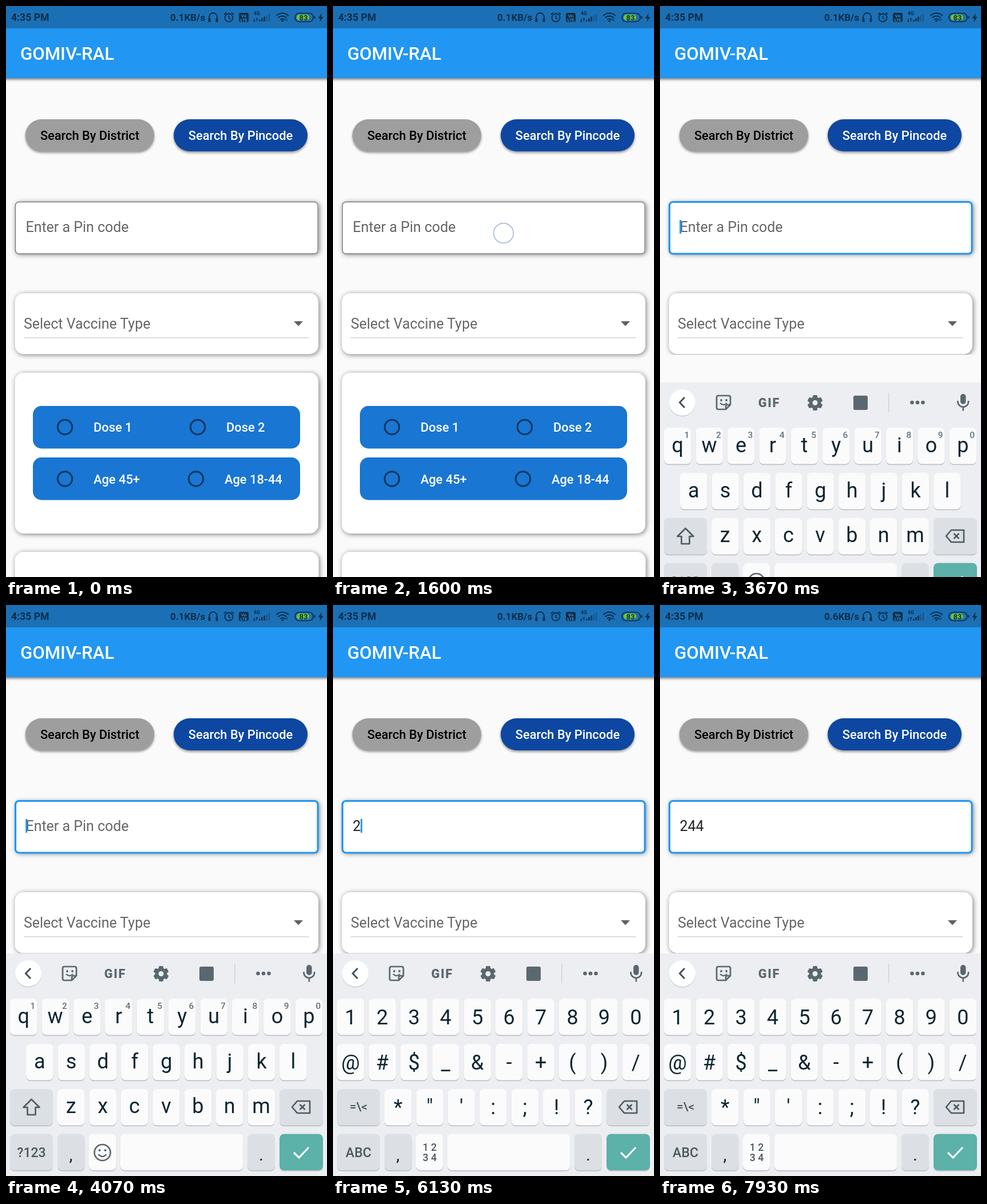
Write an HTML page that moves like this. It is 561 by 998 pixels and loops after 8 s.

```html
<!DOCTYPE html>
<html lang="en">
<head>
<meta charset="utf-8">
<title>Slot search</title>
<style>
html, body { margin: 0; width: 100%; height: 100%; overflow: hidden; background: #fafafa; }
svg { display: block; width: 561px; height: 998px; }
text { font-family: Roboto, sans-serif; white-space: pre; }
</style>
</head>
<body>
<svg id="stage" viewBox="0 0 561 998" xmlns="http://www.w3.org/2000/svg"></svg>
<script>
const LOOP = 8000;
const INK = '#0c2530', ICON = '#5a676f', STATUS = '#0d2d4a';

// ---------- markup helpers ----------
const rect = (x, y, w, h, r, fill, more = '') =>
  `<rect x="${x}" y="${y}" width="${w}" height="${h}" rx="${r}" fill="${fill}" ${more}/>`;
const text = (x, y, size, str, fill, more = '') =>
  `<text x="${x}" y="${y}" font-size="${size}" fill="${fill}" ${more}>${str}</text>`;
const mid = (x, y, size, str, fill, more = '') =>
  text(x, y, size, str, fill, 'text-anchor="middle" ' + more);
const path = (d, fill, more = '') => `<path d="${d}" fill="${fill}" ${more}/>`;
const line = (d, stroke, w, more = '') =>
  path(d, 'none', `stroke="${stroke}" stroke-width="${w}" ${more}`);
const circle = (x, y, r, fill, more = '') =>
  `<circle cx="${x}" cy="${y}" r="${r}" fill="${fill}" ${more}/>`;
const group = (id, body, more = '') => `<g id="${id}" ${more}>${body}</g>`;
const BOLD = 'font-weight="700"', MEDIUM = 'font-weight="500"';

// ---------- app ----------
const card = (x, y, w, h, r) =>
  rect(x + 1.5, y + 1.5, w, h, r, '#000', 'opacity=".5" filter="url(#soft)"') +
  rect(x, y, w, h, r, '#fff');

const dropdown = (label, y, arrow, gap) =>
  text(31, y + 9, 24.93, label, '#666') +
  path(`M503 ${y - 4}h16l-8 8.5z`, arrow) +
  rect(31, y + gap, 498.5, 1.5, 0, '#d2d2d2');

const pill = (id, x, w, label) =>
  rect(x, 200.5, w, 56, 28, '#000', 'opacity=".42" filter="url(#lift)"') +
  rect(x, 198, w, 56, 28, '#9e9e9e', `id="${id}Bg"`) +
  mid(x + w / 2, 234, 21.8, label, '#000', `id="${id}Text" ` + MEDIUM);

const radio = (x, y, label, tx) =>
  circle(x, y, 12.7, 'none', 'stroke="#0c3660" stroke-width="3"') +
  text(tx, y + 8, 21.8, label, '#fff', MEDIUM);

const statusBar = () => {
  let s = rect(0, 0, 561, 39, 0, '#1b70b5') +
    text(9, 26, 17.6, '4:35 PM', STATUS, BOLD) +
    text(287, 26, 17, '0.1KB/s', STATUS, 'id="speed" ' + BOLD);
  // headphones, alarm
  s += line('M355 25v-5a7 8 0 0 1 14 0v5', STATUS, 1.8) +
    rect(353.5, 21, 4, 7, 1.5, STATUS) + rect(366.5, 21, 4, 7, 1.5, STATUS);
  s += circle(389.5, 20.5, 7, 'none', `stroke="${STATUS}" stroke-width="1.8"`) +
    line('M389.5 16.5v4.5l3 2M381 15l4-3.5M398 15l-4-3.5', STATUS, 1.7);
  s += rect(407, 12, 17, 16, 3, STATUS) +
    mid(415.5, 19.5, 8, 'Vo', '#3e8bc4', BOLD) + mid(415.5, 26.5, 7.5, 'LTE', '#3e8bc4', BOLD);
  // mobile signal
  s += text(433, 16, 8.5, '4G', STATUS, BOLD) +
    line('M434 22v5m-1.5-1.5 1.5 2 1.5-2M438.5 27v-5m-1.5 1.5 1.5-2 1.5 2', STATUS, 1.1);
  for (let i = 0; i < 5; i++)
    s += rect(442 + i * 4.2, 24 - i * 2.7, 2.5, 3 + i * 2.7, .5, STATUS, i > 2 ? 'opacity=".35"' : '');
  // wifi
  s += line('M472 17q11-9 22 0M475.500 20.500q7.500-6 15 0M479 24q4-3 8 0', STATUS, 2) +
    circle(483, 26.3, 1.8, STATUS) + line('M488 26v-4m3 0v4', STATUS, 1.1);
  // battery
  s += rect(505, 12.500, 32, 15, 7.5, 'none', `stroke="${STATUS}" stroke-width="1.7"`) +
    rect(508, 15, 22, 10, 5, '#6fc72b') + rect(538.5, 17.5, 2, 5, 1, STATUS) +
    mid(520, 24.6, 13, '83', STATUS, BOLD);
  return s + path('M552 12l-6.500 9.500h4l-1.500 7 6.500-9.500h-4z', STATUS);
};

const app = () =>
  rect(0, 0, 561, 998, 0, '#fafafa') +
  pill('district', 34, 225, 'Search By District') +
  pill('pincode', 293, 234, 'Search By Pincode') +
  group('districtForm',
    dropdown('Select State', 326, '#616161', 18) +
    dropdown('Select District', 404, '#bdbdbd', 18)) +
  group('pinForm',
    card(16, 342, 530, 91, 7) +
    rect(16.5, 342.5, 528.5, 90.5, 6, 'none', 'id="border"') +
    text(34.5, 395, 24.93, '', '#666', 'id="entry"') +
    rect(34.2, 374, 3, 24, 0, '#2196f3', 'id="cursor"')) +
  card(15.500, 502, 530.5, 106.5, 15) + dropdown('Select Vaccine Type', 555, '#616161', 24) +
  group('lower',
    card(15.5, 641, 530.5, 281, 15) +
    rect(47, 699, 467, 74.5, 15, '#1976d2') +
    radio(103, 736, 'Dose 1', 153) + radio(335, 736, 'Dose 2', 385) +
    rect(47, 789, 467, 74.5, 15, '#1976d2') +
    radio(103, 826.5, 'Age 45+', 153) + radio(332, 826.5, 'Age 18-44', 382) +
    card(15.5, 954, 531, 80, 15)) +
  rect(0, 609.5, 561, 389, 0, '#fafafa', 'id="cut"') +
  rect(-10, 41, 581, 87.5, 0, '#000', 'opacity=".5" filter="url(#lift)"') +
  rect(0, 39, 561, 87, 0, '#2196f3') +
  text(25, 94, 31.2, 'GOMIV-RAL', '#fff', MEDIUM) +
  statusBar();

// ---------- keyboard ----------
const STEP = 55.4, ROWS = [688, 767, 846, 924.500];
const WHITE = '#fbfbfc', GREY = '#dcdfe3';

const key = (x, row, w, fill, more = '') =>
  rect(x, ROWS[row] + 1.8, w, 63.500, 8, '#bfc2c6') + rect(x, ROWS[row], w, 63.500, 8, fill, more);

const keyRow = (chars, row, x, base) => [...chars].map((c, i) =>
  key(x + i * STEP, row, 47.5, WHITE) +
  mid(x + 23.7 + i * STEP, ROWS[row] + base, 36, c === '&' ? '&amp;' : c, INK)).join('');

const bottomKeys = () =>
  key(7, 2, 75, GREY) + key(478, 2, 76, GREY) +
  line('M509 867h22v21h-22l-9-10.500z', '#4c5a62', 2.6, 'stroke-linejoin="round"') +
  line('M513.500 873l9 9m0-9l-9 9', '#4c5a62', 2.6) +
  key(7, 3, 75, GREY, 'id="modeKey"') + key(90, 3, 47.5, GREY) + key(145, 3, 47.5, WHITE) +
  key(200, 3, 214.5, WHITE) + key(422, 3, 48, GREY) + key(478, 3, 76, '#5cb1a9') +
  line('M503 957l9 9 17-18', '#fff', 3.2) +
  mid(113.5, 971, 30, ',', INK) + mid(446, 971, 30, '.', INK);

const toolbar = () => {
  let s = circle(39, 645.5, 23, '#c9ccd0') + circle(39, 644, 23, '#fff') +
    line('M43 635l-8.500 9 8.500 9', '#455159', 3);
  // sticker
  s += line('M102 632h18q3 0 3 3v13l-8 8h-13q-3 0-3-3v-18q0-3 3-3zM123 648h-5q-3 0-3 3v5', ICON, 2.7) +
    circle(107, 640, 1.9, ICON) + circle(116, 640, 1.9, ICON) +
    line('M105 645q6 6 12 0', ICON, 2.4);
  s += mid(191, 651.500, 21.5, 'GIF', ICON, 'font-weight="900" letter-spacing="1.8"');
  // gear
  for (let a = 0; a < 360; a += 60)
    s += rect(267, 631, 8, 8, 2, ICON, `transform="rotate(${a} 271 644.5)"`);
  s += circle(271, 644.5, 7.5, 'none', `stroke="${ICON}" stroke-width="6"`);
  s += rect(338, 632, 25, 25, 3, ICON);
  s += rect(399, 627, 1.5, 34, 0, '#cfd3d7');
  for (let i = -1; i < 2; i++) s += circle(450 + i * 9.5, 644, 3.3, ICON);
  // microphone
  s += rect(525, 629, 9.5, 18, 4.7, ICON) +
    line('M520.500 641v1.500a9.300 9.300 0 0 0 18.600 0v-1.500M529.800 652v6.500', ICON, 2.7);
  return s;
};

const letters = () => {
  const nums = [...'1234567890'].map((c, i) =>
    mid(47 + i * STEP, 705.5, 15.5, c, '#64717a', MEDIUM)).join('');
  return keyRow('qwertyuiop', 0, 7, 43) + nums + keyRow('asdfghjkl', 1, 35, 43) +
    keyRow('zxcvbnm', 2, 90, 42) +
    line('M44.500 864l-14 14h7v13h14v-13h7z', '#4c5a62', 2.6, 'stroke-linejoin="round"') +
    mid(44.5, 965, 23, '?123', '#4a575f', MEDIUM) +
    circle(168.5, 957, 14, 'none', `stroke="${ICON}" stroke-width="2.7"`) +
    circle(163.5, 953, 2, ICON) + circle(173.500, 953, 2, ICON) +
    line('M161.500 960q7 8 14 0', ICON, 2.4);
};

const symbols = () =>
  keyRow('1234567890', 0, 7, 45) + keyRow('@#$_&-+()/', 1, 7, 45) +
  keyRow('*"\':;!?', 2, 90, 44) +
  mid(44.5, 884, 21, '=\\&lt;', '#4a575f', MEDIUM) +
  mid(44.5, 965, 23, 'ABC', '#4a575f', MEDIUM) +
  mid(169, 954, 17.5, '1 2', '#4a575f', MEDIUM) + mid(169, 972, 17.5, '3 4', '#4a575f', MEDIUM);

const popup = () =>
  rect(-30, 579, 60, 175, 7, '#000', 'opacity=".4" filter="url(#lift)"') +
  rect(-30, 577, 60, 175, 7, '#d4d6da') +
  mid(0, 636, 42, '', '#33505a', 'id="popText"') +
  [9, 15, 21].map(x => circle(x, 655, 1.6, '#33505a')).join('');

const stage = document.getElementById('stage');
stage.innerHTML =
  `<defs>
    <filter id="soft" x="-10%" y="-30%" width="120%" height="160%"><feGaussianBlur stdDeviation="4.2"/></filter>
    <filter id="lift" x="-20%" y="-30%" width="140%" height="160%"><feGaussianBlur stdDeviation="2.3"/></filter>
  </defs>` + app() +
  group('keyboard', rect(0, 609, 561, 500, 0, '#eceef1') + toolbar() + bottomKeys() +
    group('letters', letters()) + group('symbols', symbols())) +
  group('popup', popup()) +
  circle(0, 0, 17.300, '#fff', 'id="touch" fill-opacity=".6" stroke="#b7c4da" stroke-width="2"');

// ---------- timeline ----------
const el = id => document.getElementById(id);
const show = (id, on) => { el(id).style.display = on ? '' : 'none'; };
const set = (id, attrs) => { for (const k in attrs) el(id).setAttribute(k, attrs[k]); };
const within = (t, a, b) => t >= a && t < b;
const ramp = (t, a, d) => Math.min(1, Math.max(0, (t - a) / d));
const mix = (a, b, p) => `rgb(${a.map((v, i) => Math.round(v + (b[i] - v) * p)).join()})`;

const TO_DISTRICT = 330, TO_PIN = 1200, FOCUS = 1800, RESIZE = 2390, KEYS_IN = 3660, TO_SYMBOLS = 4530;
const taps = [
  { x: 168, y: 230, from: 130, to: 310 },
  { x: 408, y: 230, from: 1000, to: 1180 },
  { x: 298, y: 397, from: 1520, to: 1700 },
  { x: 42, y: 958, from: 4330, to: 4500 },
  { x: 82, y: 718, from: 5930, to: 6030 },
  { x: 187, y: 716, from: 6730, to: 6850 },
  { x: 188, y: 717, from: 7200, to: 7320 }
];
const presses = [
  { key: '2', from: 5930, insert: 6000, to: 6120 },
  { key: '4', from: 6730, insert: 6860, to: 6960 },
  { key: '4', from: 7200, insert: 7330, to: 7440 }
];
const cursorOn = [[1800, 2130], [2800, 3130], [3660, 4130], [4630, 5130], [5670, 6470], [6860, 7800]];

function pillLook(id, p) {
  set(id + 'Bg', { fill: mix([158, 158, 158], [13, 71, 161], p) });
  set(id + 'Text', { fill: mix([0, 0, 0], [255, 255, 255], p) });
}

function draw(t) {
  const d = ramp(t, TO_DISTRICT, 160) - ramp(t, TO_PIN, 160);
  pillLook('district', d);
  pillLook('pincode', 1 - d);
  const byDistrict = within(t, TO_DISTRICT, TO_PIN);
  show('districtForm', byDistrict);
  show('pinForm', !byDistrict);

  const f = ramp(t, FOCUS, 160);
  set('border', { stroke: mix([125, 125, 125], [33, 150, 243], f), 'stroke-width': 1.4 + 1.8 * f });
  const typed = presses.filter(p => t >= p.insert).map(p => p.key).join('');
  el('entry').textContent = typed || 'Enter a Pin code';
  set('entry', { fill: typed ? '#212121' : '#666' });
  set('cursor', { x: 34.2 + typed.length * 14 });
  show('cursor', cursorOn.some(([a, b]) => within(t, a, b)));

  show('lower', t < RESIZE);
  show('cut', t >= RESIZE);
  el('speed').textContent = t < 6200 ? '0.1KB/s' : '0.6KB/s';

  show('keyboard', t >= KEYS_IN);
  const slide = 49 * Math.pow(1 - ramp(t, KEYS_IN + 20, 200), 2);
  set('keyboard', { transform: `translate(0 ${slide.toFixed(2)})` });
  show('letters', t < TO_SYMBOLS);
  show('symbols', t >= TO_SYMBOLS);
  set('modeKey', { fill: within(t, 4330, TO_SYMBOLS) ? '#c3c7cc' : GREY });

  const press = presses.find(p => within(t, p.from, p.to));
  show('popup', press);
  if (press) {
    set('popup', { transform: `translate(${30.7 + STEP * (press.key - 1)} 0)` });
    el('popText').textContent = press.key;
  }

  const tap = taps.find(p => within(t, p.from, p.to));
  show('touch', tap);
  if (tap) set('touch', { cx: tap.x, cy: tap.y });
}

function tick(now) {
  draw(now % LOOP);
  requestAnimationFrame(tick);
}
draw(0);
requestAnimationFrame(tick);
</script>
</body>
</html>
```
